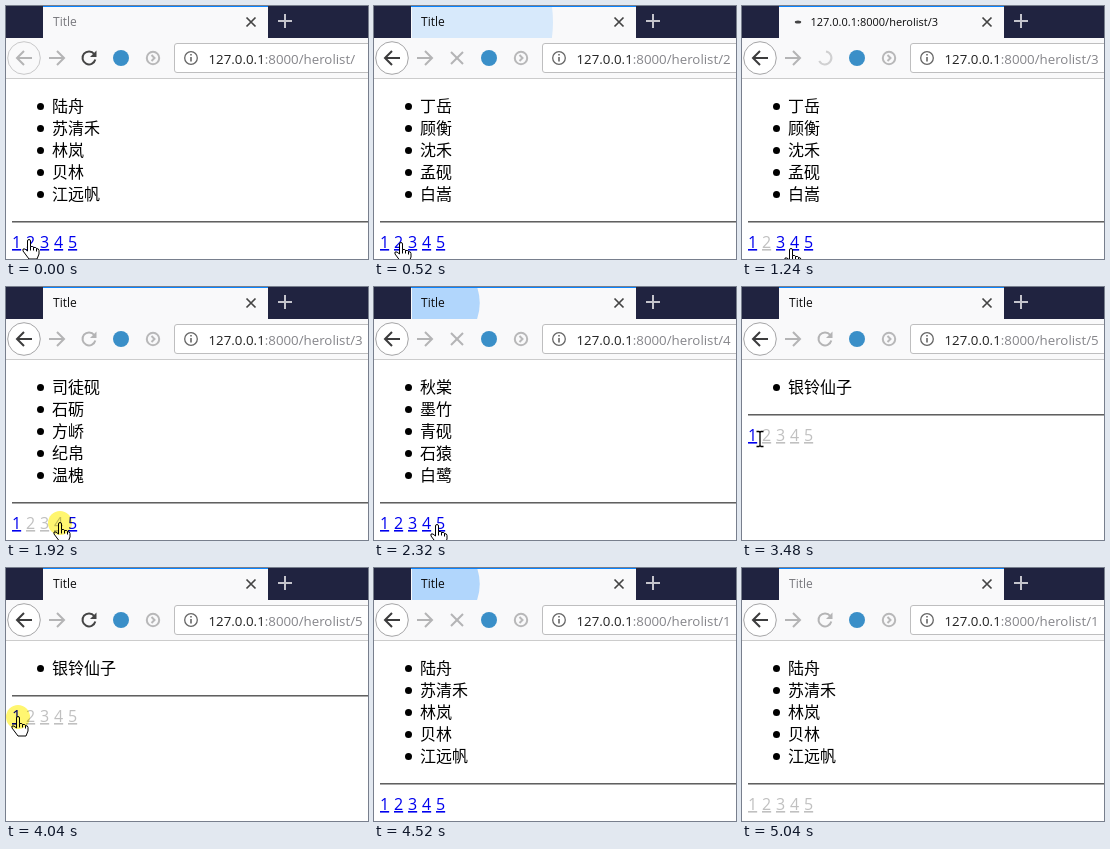
An HTML page for the animation above (5.12 s loop, 362 by 253 pixels).

```html
<!DOCTYPE html>
<html lang="zh">
<head>
<meta charset="utf-8">
<title>Title</title>
<style>
html, body { margin: 0; height: 100%; overflow: hidden; background: #fff; }
svg { display: block; width: 362px; height: 253px; font: 16px "Open Sans", "Noto Sans CJK SC", "Noto Sans CJK", sans-serif; }
#address { font-size: 13.3px; }
.line { fill: none; stroke-width: 2; }
.cursor { fill: #fff; stroke: #000; }
#links text { text-decoration: underline; }
#click { mix-blend-mode: multiply; }
</style>
</head>
<body>
<svg viewBox="0 0 362 253">
  <defs><clipPath id="tabClip"><rect x="38" y="1" width="224" height="31"/></clipPath></defs>
  <rect width="362" height="253" fill="#fff"/>

  <g id="heroes"></g>
  <g id="footer">
    <path d="M6 215.5H362" stroke="#606060"/><path d="M6 216.5H362" stroke="#a8a8a8"/>
    <g id="links"></g>
  </g>

  <rect width="362" height="32" fill="#202340"/>
  <rect x="37" width="225" height="32" fill="#f9f9fa"/>
  <rect x="37" width="225" height="1" fill="#0a84ff"/>
  <circle id="burst" cx="57" cy="16" fill="#0a84ff" clip-path="url(#tabClip)"/>
  <ellipse id="throbber" cy="16" rx="3.2" ry="1.5" fill="#444"/>
  <text id="tabTitle" y="20"></text>
  <path class="line" d="M240.5 11.5l9 9m0-9l-9 9" stroke="#444" style="stroke-width:1.7"/>
  <path class="line" d="M272 15h14m-7-7v14" stroke="#c4c4cc"/>

  <rect y="32" width="362" height="40" fill="#f9f9fa"/>
  <path d="M0 72.5H362" stroke="#ccc"/>
  <circle id="backRing" cx="18" cy="52" r="16.3"/>
  <path id="backArrow" class="line" d="M26 52H11m7-7l-7 7l7 7"/>
  <path class="line" d="M43 52H58m-7-7l7 7l-7 7" stroke="#b4b4b5"/>
  <g id="reload">
    <path class="line" d="M88.2 48A6.5 6.5 0 1 0 89.3 53.5"/>
    <path d="M90.5 44.5V51H84Z" stroke="none"/>
  </g>
  <path id="reloadTail" class="line" d="M84 45.5A6.5 6.5 0 1 1 77.2 55" stroke="#d0d0d1"/>
  <path id="stop1" class="line" d="M77 46L89 58" stroke="#b4b4b5" pathLength="1"/>
  <path id="stop2" class="line" d="M89 46L77 58" stroke="#b4b4b5" pathLength="1"/>
  <circle cx="115" cy="52" r="8" fill="#3a8fc8"/>
  <circle class="line" cx="147" cy="52" r="6.2" stroke="#b8b8b9"/>
  <path class="line" d="M145.5 49l3 3l-3 3" stroke="#b8b8b9"/>
  <rect x="168.5" y="37.5" width="220" height="29" rx="2.5" fill="#fff" stroke="#bebebf"/>
  <circle class="line" cx="185" cy="52" r="6.3" stroke="#666" style="stroke-width:1.3"/>
  <path d="M185 51v4.5m0-7.5v1.6" stroke="#666" stroke-width="1.6"/>
  <text id="address" x="202.5" y="58" fill="#222">127.0.0.1<tspan id="path" fill="#85858a"></tspan></text>

  <g id="cursor">
    <path class="cursor" id="hand" d="M-1.5 1a1.5 1.5 0 0 1 3 0V6.5q3-.5 3 1q3-.5 3 1q2.5 0 2.5 2V14L8 19H0L-6 11q-1-3 2-2l2.5 2Z M1.5 6.5v4m3-3v3m3-2v3"/>
    <path class="cursor" id="arrow" d="M.5 .5V16L4 12.5L6.5 18L9 17L6.5 11.5H11.5Z"/>
    <path id="beam" fill="none" stroke="#000" stroke-width="1.3" d="M-3.5-7.5h2.5l1 1l1-1h2.5M0-6.5v13M-3.5 7.5h2.5l1-1l1 1h2.5"/>
  </g>
  <circle id="click" r="12" fill="#fff670"/>
</svg>
<script>
const LOOP = 5120;
const GREY = '#b4b4b5', BLUE = '#0000ee', SILVER = '#c0c0c0';
const HOST = '127.0.0.1';
const pages = {
  1: ['陆舟', '苏清禾', '林岚', '贝林', '江远帆'],
  2: ['丁岳', '顾衡', '沈禾', '孟砚', '白嵩'],
  3: ['司徒砚', '石砺', '方峤', '纪帛', '温槐'],
  4: ['秋棠', '墨竹', '青砚', '石猿', '白鹭'],
  5: ['银铃仙子'],
};
// Page loads: time, page
const loads = [[80, 2], [1240, 3], [2000, 4], [2640, 5], [4200, 1]];
// Cursor keys: time, x, y
const route = [
  [0, 23, 234], [440, 24, 236], [600, 29, 238], [1040, 40, 238], [1160, 41, 239],
  [1240, 49, 243], [1600, 52, 239], [1840, 54, 236], [2080, 54, 236], [2400, 66, 238],
  [2640, 64, 238], [2960, 63, 238], [3400, 19, 153], [3480, 18, 152], [3640, 17, 152],
  [3800, 13, 151], [4040, 12, 149], [4200, 12, 149], [4480, -22, 149],
];
// Click highlights: start, end
const clicks = [[80, 240], [1120, 1220], [1880, 2000], [2480, 2640], [3640, 3760], [4040, 4200]];

const $ = id => document.getElementById(id);
const set = (id, attrs) => { for (const k in attrs) $(id).setAttribute(k, attrs[k]); };
const show = (id, on) => { $(id).style.display = on ? '' : 'none'; };
const clamp = x => Math.max(0, Math.min(1, x));
const within = (t, [a, b]) => t >= a && t < b;

$('links').innerHTML = [1, 2, 3, 4, 5]
  .map((n, i) => `<text x="${6 + 14 * i}" y="242">${n}</text>`).join('');

let shownPage;
function showPage(n) {
  if (n === shownPage) return;
  shownPage = n;
  $('heroes').innerHTML = pages[n].map((name, i) =>
    `<circle cx="34.5" cy="${100.5 + 22 * i}" r="3.5"/><text x="46" y="${106 + 22 * i}">${name}</text>`).join('');
  set('footer', { transform: `translate(0 ${22 * (pages[n].length - 5)})` });
}

function drawPage(t, index, age) {
  const loaded = age >= 80 ? index : index - 1;
  showPage(loaded < 0 ? 1 : loads[loaded][1]);
  // Visited links turn silver some time after the page has arrived
  const settled = age >= 640 || age < 80;
  const visited = settled ? loads.slice(0, loaded + 1).map(l => l[1]) : [];
  if (within(t, [1880, 2080])) visited.push(4);
  [...$('links').children].forEach((link, i) =>
    link.setAttribute('fill', visited.includes(i + 1) ? SILVER : BLUE));
}

function drawTab(t, index, age, path) {
  const started = index >= 0;
  const waiting = started && age < 80, busy = started && age < 260;
  const blurred = t < 80 || t >= 4960;
  $('tabTitle').textContent = waiting ? HOST + path : 'Title';
  set('tabTitle', {
    x: busy ? 68.5 : 47,
    fill: blurred ? '#77777c' : '#0c0c0d',
    'font-size': waiting ? 11 : 12,
  });
  show('throbber', busy);
  set('throbber', { cx: busy ? 56 + 4 * Math.sin(age / 300) : 56 });
  const p = started ? clamp((age - 260) / 375) : 1;
  const eased = 1 - (1 - p) ** 1.6;
  show('burst', p > 0 && p < 1);
  set('burst', { r: 4 + 181 * eased, opacity: 0.4 * (1 - eased) });
}

function drawToolbar(index, age, path) {
  const started = index >= 0;
  $('path').textContent = path;
  set('backRing', { fill: started ? '#fff' : '#f9f9fa', stroke: started ? '#a5a5a7' : '#c8c8c9' });
  set('backArrow', { stroke: started ? '#3c3c3d' : GREY });

  const leaving = started && age < 80;
  const idle = !started || age >= 640;
  const color = !started || age >= 900 ? '#444' : GREY;
  show('reload', idle);
  set('reload', { stroke: color, fill: color });
  show('reloadTail', leaving);
  const growStroke = (id, from) => {
    const amount = clamp((age - from) / 110);
    show(id, !leaving && !idle && amount > 0);
    set(id, { 'stroke-dasharray': `${amount} 2` });
  };
  growStroke('stop1', 40);
  growStroke('stop2', 130);
}

function drawCursor(t) {
  const next = route.findIndex(k => k[0] > t);
  const b = next < 0 ? route[route.length - 1] : route[next];
  const a = next < 0 ? b : route[next - 1];
  const p = a === b ? 1 : (t - a[0]) / (b[0] - a[0]);
  const x = Math.round(a[1] + (b[1] - a[1]) * p);
  const y = Math.round(a[2] + (b[2] - a[2]) * p);
  set('cursor', { transform: `translate(${x} ${y})` });
  const arrow = within(t, [2680, 3400]), beam = within(t, [3400, 3760]);
  show('arrow', arrow);
  show('beam', beam);
  show('hand', !arrow && !beam);
  show('click', clicks.some(c => within(t, c)));
  set('click', { cx: x, cy: y });
}

function draw(now) {
  const t = now % LOOP;
  const index = loads.filter(l => l[0] <= t).length - 1;
  const age = index < 0 ? 1000 : t - loads[index][0];
  const path = ':8000/herolist/' + (index < 0 ? '' : loads[index][1]);
  drawPage(t, index, age);
  drawTab(t, index, age, path);
  drawToolbar(index, age, path);
  drawCursor(t);
}

const start = performance.now();
function tick() {
  draw(performance.now() - start);
  requestAnimationFrame(tick);
}
tick();
</script>
</body>
</html>
```
